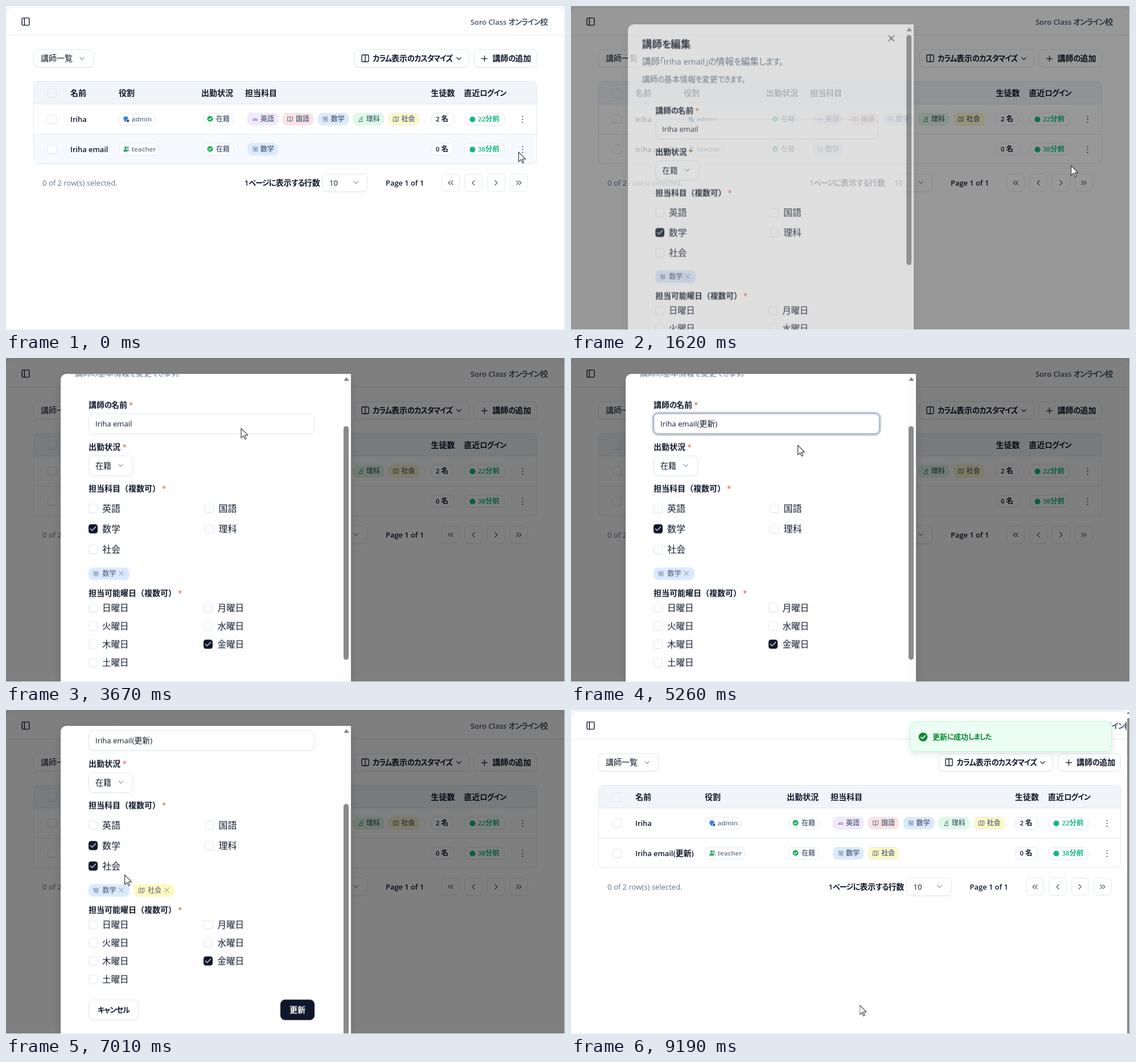
An HTML page that plays this animation: 982 by 570 pixels, repeating every 9.52 s.

```html
<!DOCTYPE html>
<html lang="ja">
<head>
<meta charset="utf-8">
<title>講師一覧</title>
<style>
html, body { margin: 0; width: 100%; height: 100%; overflow: hidden; background: #ececee; }
#stage {
  position: absolute; width: 981px; height: 569px; overflow: hidden; background: #f8f9fa; color: #0f172a;
  font-family: "Open Sans", "Noto Sans CJK JP", "Noto Sans CJK", sans-serif;
}
#stage div, #stage svg { position: absolute; box-sizing: border-box; }
.layer { left: 0; top: 0; width: 981px; height: 569px; }
.text { white-space: pre; line-height: 20px; }
.latin { font-size: .935em; }
.bold .latin { font-size: .92em; }
.kana { font-size: .94em; letter-spacing: -.07em; font-feature-settings: "palt"; }
.bold { font-weight: 600; }
.muted { color: #64748b; }
.slate { color: #475569; }
.green { color: #10b981; }
.white { color: #fff; }
.star { color: #ea4a1f; }
.toast-text { color: #008a2e; }
.box { border: 1px solid #e2e8f0; border-radius: 8px; background: #fff; }
.soft { box-shadow: 0 1px 2px #0000000d; }
.modal { background: #fff; border-radius: 10px; overflow: hidden; box-shadow: 0 8px 16px #0000001f; }
.ring { border: 1px solid #8c9db5; border-radius: 8px; box-shadow: 0 0 0 3px #90a1b980; }
.caret { display: inline-block; width: 1px; height: 18px; margin-left: 1px; vertical-align: -4px; background: #0f172a; }
</style>
</head>
<body>
<div id="stage"></div>
<script>
const LOOP = 9520, INK = '#0f172a', MUTED = '#64748b';
const TEACHER = 'Iriha', ACCOUNT = 'Iriha email', SCHOOL = 'Soro Class オンライン校';
const stage = document.getElementById('stage');

const FRAME = 'M5 3h14a2 2 0 0 1 2 2v14a2 2 0 0 1-2 2H5a2 2 0 0 1-2-2V5a2 2 0 0 1 2-2z';
const DISC = 'M1 12a11 11 0 1 0 22 0a11 11 0 1 0-22 0z';
const ICON = {
  panel: FRAME + 'M9 3v18',
  columns: FRAME + 'M12 3v18',
  down: 'M6 9l6 6 6-6',
  plus: 'M4 12h16M12 4v16',
  close: 'M19 5 5 19M5 5l14 14',
  check: 'M20 6 9 17l-5-5',
  tick: 'M7 12.5l3.5 3.5 6.5-7',
  first: 'M11 17l-5-5 5-5M18 17l-5-5 5-5',
  prev: 'M15 18l-6-6 6-6',
  next: 'M9 18l6-6-6-6',
  last: 'M6 17l5-5-5-5M13 17l5-5-5-5',
  dots: 'M12 4v.01M12 12v.01M12 20v.01',
  book: 'M12 7v14M3 18V4h5q4 0 4 3q0-3 4-3h5v14h-6q-3 0-3 3q0-3-3-3z',
  map: 'M3 6l6-3 6 3 6-3v15l-6 3-6-3-6 3zM9 3v15M15 6v15',
  math: 'M3 12h18M12 3v18M16.5 4.5l3 3M19.5 4.5l-3 3M6 4v4M4 6h4M18 16v.01M18 20v.01M4 18h4M16 18h4',
  scope: 'M5 21h14M6 18h2M7 18v3M9 11l3 3 6-6-3-3zM10.5 12.5L9 14M17 3l3 3M12 21a6 6 0 0 0 3.7-10.7',
  shield: 'M11 2l8 3v6c0 5-3 9-8 11-5-2-8-6-8-11V5z',
  users: 'M5 7a4 4 0 1 0 8 0a4 4 0 1 0-8 0zM2 21v-3q0-4 4-4h6q4 0 4 4v3zM16 3a4 4 0 0 1 0 8M18 14q4 1 4 4v3',
  spinner: 'M21 12a9 9 0 1 1-6.219-8.56',
};
const SUBJECT = {
  英語: ['#f3e8ff'],
  国語: ['#fee2e2', ICON.book],
  数学: ['#dbeafe', ICON.math],
  理科: ['#dcfce7', ICON.scope],
  社会: ['#fef9c3', ICON.map],
};

const mark = s => s.replace(/([ -~]+)|[ぁ-ヿ、-」]+/g,
  (run, latin) => `<span class="${latin ? 'latin' : 'kana'}">${run}</span>`);

function add(parent, cls, style = {}, html = '') {
  const node = document.createElement('div');
  node.className = cls;
  Object.assign(node.style, style);
  node.innerHTML = html;
  parent.append(node);
  return node;
}
const px = (left, top, width, height) =>
  ({ left: left + 'px', top: top + 'px', width: width + 'px', height: height + 'px' });
const box = (parent, x, y, w, h, style, cls = 'box') => add(parent, cls, { ...px(x, y, w, h), ...style });
const layer = parent => add(parent, 'layer');
const text = (parent, x, cy, s, cls = '', size = 14) =>
  add(parent, 'text ' + cls, { left: x + 'px', top: cy - 10 + 'px', fontSize: size + 'px' }, mark(s));

function icon(parent, cx, cy, size, d, color = INK, width = 2, fill = 'none') {
  parent.insertAdjacentHTML('beforeend',
    `<svg viewBox="0 0 24 24" width="${size}" height="${size}" style="left:${cx - size / 2}px;top:${cy - size / 2}px"
      fill="${fill}" stroke="${color}" stroke-width="${width}" stroke-linecap="round" stroke-linejoin="round"><path d="${d}"/></svg>`);
  return parent.lastElementChild;
}
function success(parent, cx, cy, size, color) {
  icon(parent, cx, cy, size, DISC, 'none', 0, color);
  icon(parent, cx, cy, size, ICON.tick, '#fff', 2.8);
}
function checkbox(parent, x, cy, checked) {
  const node = box(parent, x, cy - 8, 16, 16, { borderRadius: '4px' }, 'box soft');
  if (checked) {
    Object.assign(node.style, { background: INK, borderColor: INK });
    icon(node, 7, 7, 14, ICON.check, '#fff');
  }
  return node;
}
function subject(parent, x, cy, name, removable) {
  const [background, d] = SUBJECT[name];
  const node = box(parent, x, cy - 11, removable ? 72 : 54, 22, { background, borderColor: removable ? background : '#e2e8f0' });
  if (d) icon(node, 12.5, 10, 12, d, MUTED);
  else text(node, 8, 10, 'ab', 'bold muted', 8.5);
  text(node, removable ? 24 : 22, 10, name, removable ? 'slate' : 'bold muted', 12);
  if (removable) icon(node, 57, 10, 13, ICON.close, MUTED, 1.7);
  return node;
}

// Each step: [ms, properties, easing towards the next step]; without easing it holds.
function play(node, steps) {
  const frames = steps.map(([ms, props, easing = 'step-end']) => ({ ...props, offset: ms / LOOP, easing }));
  frames.push({ ...steps.at(-1)[1], offset: 1 });
  node.animate(frames, { duration: LOOP, iterations: Infinity });
}
const fade = (node, steps) => play(node, steps.map(([ms, opacity, ease]) => [ms, { opacity }, ease]));
// Toggles a hidden node at every given time.
const toggle = (node, ...times) => fade(node, [[0, 0], ...times.map((ms, i) => [ms, (i + 1) % 2])]);

// Page
function row(page, cy, col, { name, role, subjects, count, login }) {
  const admin = role === 'admin';
  checkbox(page, 73, cy);
  text(page, 113, cy, name, 'bold');
  box(page, col.role, cy - 11, admin ? 64 : 70, 22);
  if (admin) {
    icon(page, col.role + 13, cy, 12, ICON.shield, 'none', 0, '#3b82d6');
    icon(page, col.role + 16, cy + 3, 6, DISC, '#fff', 3, '#1e5fae');
  } else icon(page, col.role + 13, cy - .5, 11, ICON.users, '#2f9e6e', 2, '#2f9e6e');
  text(page, col.role + 22.5, cy, role, 'bold muted', 12.6);
  box(page, col.status + 3, cy - 11, 54, 22);
  success(page, col.status + 15.5, cy - .5, 11, '#16b455');
  text(page, col.status + 26, cy, '在籍', 'bold muted', 12);
  subjects.forEach((s, i) => subject(page, col.subject + 4 + i * 61.9, cy, s));
  box(page, 746.5 + col.tail, cy - 11, 40, 22);
  text(page, 755 + col.tail, cy, count + ' 名', 'bold', 12.4);
  box(page, 804.5 + col.tail, cy - 11, 71, 22);
  icon(page, 819 + col.tail, cy, 11, DISC, 'none', 0, '#10b981');
  text(page, 829 + col.tail, cy, login, 'bold green', 12.4);
  icon(page, 907.7 + col.tail, cy, 15, ICON.dots, '#334155', 3.4);
}

function buildPage(col, rows) {
  const page = layer(stage), dx = col.tail;
  box(page, 0, 3, 981, 567, { background: '#fff', borderRadius: '12px 12px 0 0', boxShadow: '0 0 2px #0000001f' }, '');
  box(page, 0, 51, 981, 1, { background: '#e2e8f0' }, '');
  icon(page, 34, 27.5, 17, ICON.panel);
  text(page, 816 + dx, 28, SCHOOL, 'bold slate');

  box(page, 48, 76, 105.5, 32, {}, 'box soft');
  text(page, 61, 92, '講師一覧');
  icon(page, 133, 92, 15, ICON.down, '#8a94a5');
  box(page, 612 + dx, 76, 201.5, 32, {}, 'box soft');
  icon(page, 630.5 + dx, 92, 16, ICON.columns);
  text(page, 644 + dx, 92, 'カラム表示のカスタマイズ', 'bold');
  icon(page, 795 + dx, 92, 15, ICON.down);
  box(page, 821.5 + dx, 76, 111, 32, {}, 'box soft');
  icon(page, 840.5 + dx, 92, 15, ICON.plus);
  text(page, 854.5 + dx, 92, '講師の追加', 'bold');

  const table = box(page, 48, 132, 884.5 + dx, 146, { overflow: 'hidden' });
  box(table, 0, 0, 930, 40, { background: '#f1f5f9', borderBottom: '1px solid #e2e8f0' }, '');
  const hover = box(table, 0, 93, 930, 53, { background: '#f3f9fe', opacity: 0 }, '');
  box(table, 0, 92, 930, 1, { background: '#e2e8f0' }, '');
  checkbox(page, 73, 152.5).style.background = 'none';
  [[113, '名前'], [col.role, '役割'], [col.status, '出勤状況'], [col.subject, '担当科目'],
   [746.5 + dx, '生徒数'], [804.5 + dx, '直近ログイン']].forEach(([x, s]) => text(page, x, 153, s, 'bold'));
  rows.forEach((data, i) => row(page, 199 + i * 53, col, data));

  text(page, 64, 311, '0 of 2 row(s) selected.', 'muted');
  text(page, 419 + dx, 311, '1ページに表示する行数', 'bold');
  box(page, 555 + dx, 294.5, 80, 32, {}, 'box soft');
  text(page, 568 + dx, 311, '10');
  icon(page, 614 + dx, 310.5, 15, ICON.down, '#8a94a5');
  text(page, 667 + dx, 311, 'Page 1 of 1', 'bold');
  ['first', 'prev', 'next', 'last'].forEach((name, i) => {
    box(page, 765 + dx + i * 39.9, 294.5, 32, 32);
    icon(page, 781 + dx + i * 39.9, 310.5, 16, ICON[name], '#5b6472');
  });
  return { page, hover };
}
const first = { name: TEACHER, role: 'admin', subjects: Object.keys(SUBJECT), count: 2, login: '22分前' };
const second = { name: ACCOUNT, role: 'teacher', subjects: ['数学'], count: 0, login: '38分前' };
const { hover } = buildPage({ role: 198, status: 343, subject: 420, tail: 0 }, [first, second]);
fade(hover, [[0, .75, 'ease'], [200, 1], [420, 1, 'ease'], [560, 0]]);

const { page: updated } = buildPage({ role: 235, status: 379, subject: 456, tail: 33.6 },
  [first, { ...second, name: ACCOUNT + '(更新)', subjects: ['数学', '社会'] }]);
box(updated, 975.5, 0, 6, 569, { background: '#fafafa' }, '');
box(updated, 976.5, 14, 5, 560, { background: '#8b8b8b', borderRadius: '3px' }, '');
icon(updated, 979, 4.5, 6, 'M2 20 12 4l10 16z', 'none', 0, '#777');
toggle(updated, 9000);

// Row menu
const menu = box(stage, 795.5, 272, 128, 84, { transformOrigin: '100% 0', boxShadow: '0 4px 8px #0000001a' });
const choice = box(menu, 4, 4, 118, 32, { background: '#f1f5f9', borderRadius: '5px' }, '');
text(menu, 12, 20, '編集');
box(menu, 0, 40, 126, 1, { background: '#e2e8f0' }, '');
text(menu, 12, 61, '削除');
toggle(choice, 940);
play(menu, [
  [0, { opacity: 0, transform: 'scale(.95)' }],
  [410, { opacity: 0, transform: 'scale(.95)' }, 'ease'],
  [560, { opacity: 1, transform: 'none' }],
  [1545, { opacity: 0, transform: 'none' }],
]);

// Dialogs
const shade = add(stage, 'layer', { background: '#000' });
fade(shade, [[0, 0], [1520, 0, 'ease'], [1720, .5], [8790, .5, 'ease'], [8990, 0]]);

const dialog = box(stage, 96, 27.5, 509.5, 567, { borderTopRightRadius: '2px', transformOrigin: '255px 270px' }, 'modal');
play(dialog, [
  [0, { opacity: 0, transform: 'scale(.95)' }],
  [1540, { opacity: 0, transform: 'scale(.95)' }, 'ease'],
  [1740, { opacity: 1, transform: 'none' }],
  [8370, { opacity: 0, transform: 'none' }],
]);
const form = box(dialog, -96, -27.5, 981, 760, {}, '');
const required = (cy, s, starX) => {
  text(form, 145, cy, s, 'bold');
  text(form, starX, cy, '*', 'star');
};
function option(x, cy, s, size, checked) {
  checkbox(form, x, cy, checked);
  text(form, x + 24.5, cy, s, '', size);
}

icon(form, 566, 52.5, 16, ICON.close, '#333d4d');
text(form, 121, 62, '講師を編集', 'bold', 18);
text(form, 121, 93, `講師「${ACCOUNT}」の情報を編集します。`, 'muted', 16);
text(form, 121, 125, '講師の基本情報を変更できます。', 'muted');

required(181.5, '講師の名前', 216);
box(form, 144.5, 196, 397.5, 36, {}, 'box soft');
const ring = box(form, 144.5, 196, 397.5, 36, {}, 'ring');
fade(ring, [[0, 0], [3960, 0, 'ease'], [4110, 1], [6640, 1, 'ease'], [6730, 0]]);
const field = text(form, 157, 214.5, ACCOUNT);
field.insertAdjacentHTML('beforeend', `<span>${mark('(更新)')}</span><span class="caret"></span>`);
const [suffix, caret] = [...field.children].slice(-2);
toggle(suffix, 4260);
toggle(caret, 4310, 4840, 5370, 5900, 6430, 6660);

required(255, '出勤状況', 204.5);
box(form, 144.5, 270, 78, 36, {}, 'box soft');
text(form, 157, 288, '在籍');
icon(form, 201.5, 287.5, 15, ICON.down, '#8a94a5');

required(328.5, '担当科目（複数可）', 274);
['英語', '国語', '数学', '理科', '社会'].forEach((s, i) =>
  option(i % 2 ? 349 : 144.5, 363.5 + (i >> 1) * 35.8, s, 16, s === '数学'));
toggle(checkbox(form, 144.5, 435, true), 6660);
subject(form, 144.5, 478, '数学', true);
toggle(subject(form, 224, 478, '社会', true), 6660);

required(512, '担当可能曜日（複数可）', 302);
[...'日月火水木金土'].forEach((s, i) =>
  option(i % 2 ? 347 : 144.5, 538.8 + (i >> 1) * 32, s + '曜日', 15.5, s === '金'));

box(form, 144.5, 670.5, 88.5, 36, {}, 'box soft');
text(form, 161, 688.5, 'キャンセル', 'bold');
box(form, 482, 670.5, 60, 36, { background: INK, borderColor: INK });
text(form, 498, 688.5, '更新', 'bold white');

box(dialog, 496, 0, 14, 567, { background: '#fcfcfc' }, '');
icon(dialog, 501.5, 9, 10, 'M1 20 12 4l11 16z', 'none', 0, '#7f7f7f');
const thumb = box(dialog, 497, 18.5, 9, 411, { background: '#8b8b8b', borderRadius: '5px' }, '');
const scroll = [[0, 0], [3050, 0, 'ease-out'], [3260, 99.5], [5320, 99.5, 'ease-out'], [5510, 161.5]];
const scrollBy = (node, ratio) =>
  play(node, scroll.map(([ms, y, ease]) => [ms, { transform: `translateY(${y * ratio}px)` }, ease]));
scrollBy(form, -1);
scrollBy(thumb, .733);

const loading = box(stage, 96, 173, 509.5, 275, {}, 'modal');
icon(loading, 485, 25, 16, ICON.close, '#333d4d');
text(loading, 25, 35, '講師を編集', 'bold', 18);
text(loading, 25, 65, '読み込み中', 'muted', 16);
text(loading, 25, 97, '講師の基本情報を変更できます。', 'muted');
const spinner = icon(loading, 254.5, 174, 32, ICON.spinner);
text(loading, 221.5, 203.5, 'Loading...', '', 16);
play(spinner, [
  [0, { transform: 'rotate(8deg)' }],
  [8370, { transform: 'rotate(8deg)' }, 'linear'],
  [9370, { transform: 'rotate(368deg)' }],
]);
play(loading, [
  [0, { opacity: 0, transform: 'none' }],
  [8370, { opacity: 1, transform: 'none' }],
  [8790, { opacity: 1, transform: 'none' }, 'ease'],
  [8990, { opacity: 0, transform: 'scale(.95)' }],
]);

// Toast
const toast = box(stage, 595, 20, 354.5, 53, { background: '#ecfdf3', borderColor: '#bffcd9', boxShadow: '0 4px 12px #0000001a' });
success(toast, 22, 26, 17, '#008a2e');
text(toast, 39, 26, '更新に成功しました', 'bold toast-text', 13);
play(toast, [
  [0, { opacity: 0, transform: 'translateY(-53px)' }],
  [8800, { opacity: 0, transform: 'translateY(-53px)' }, 'ease'],
  [9190, { opacity: 1, transform: 'none' }],
]);

// Pointer
const pointer = icon(stage, 12.5, 12.5, 25, 'M.5.5v16.2l3.9-3.6 2.6 5.8 2.3-1-2.6-5.7h5.2z', '#222', 1, '#fff');
play(pointer, [
  [0, 900, 256.5], [750, 900, 256.5, 'ease-in-out'], [1080, 878, 280.5],
  [2100, 878, 280.5, 'ease-in-out'], [2520, 434, 254.5],
  [3260, 434, 254.5, 'ease-in-out'], [3790, 410, 108],
  [4200, 410, 108, 'ease-in-out'], [4460, 398, 153],
  [5400, 398, 153, 'ease-in-out'], [6180, 190, 262],
  [6270, 190, 262, 'ease-out'], [6520, 157, 274.5],
  [7010, 208, 289.5, 'ease-in-out'], [7900, 513, 517],
  [7970, 513, 517, 'ease-out'], [8100, 506.5, 518.5],
].map(([ms, x, y, ease]) => [ms, { transform: `translate(${x}px, ${y}px)` }, ease]));
</script>
</body>
</html>
```
